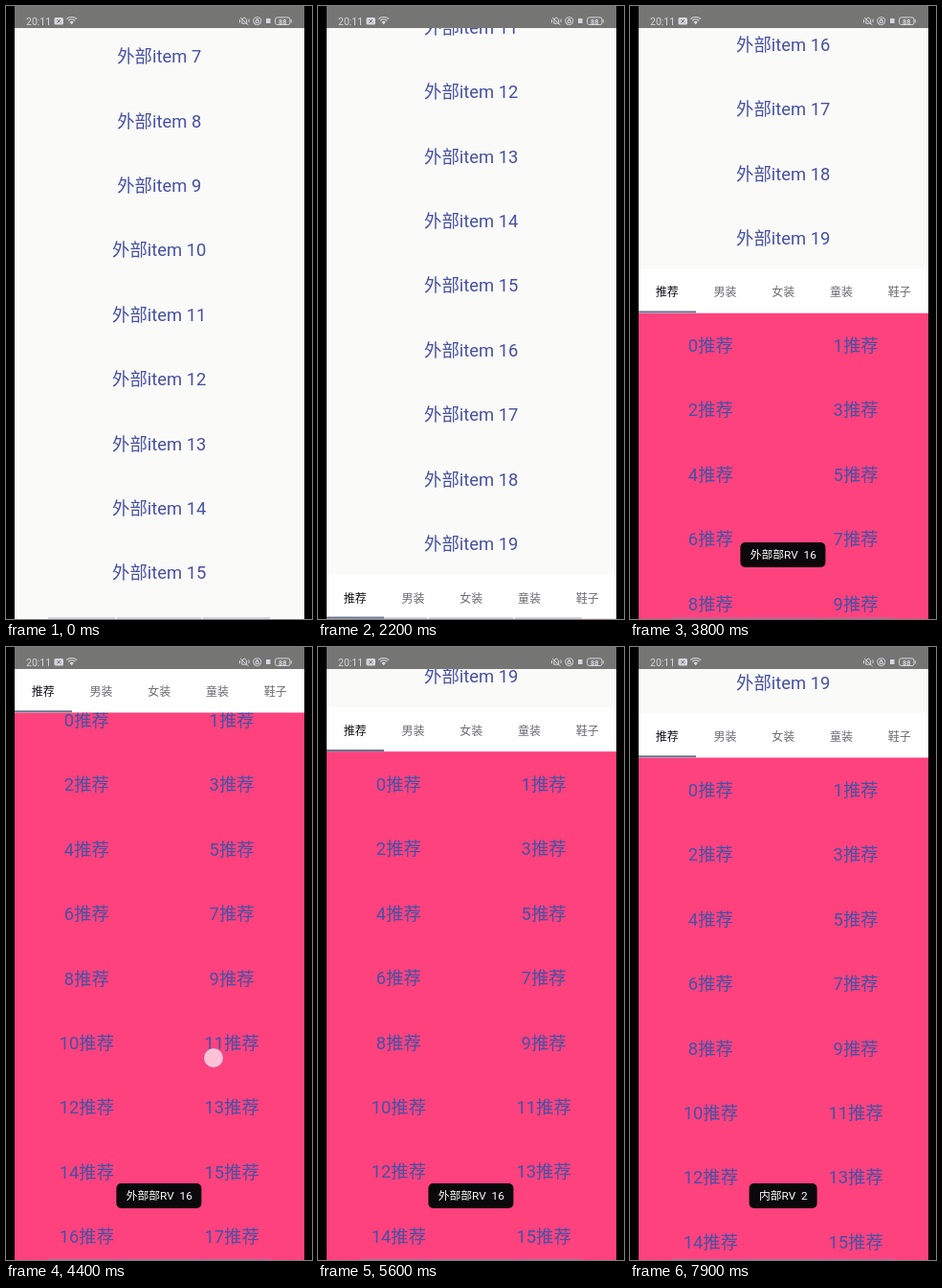
An HTML page for the animation above (8000 ms loop, 320 px wide and 640 px high).

```html
<!DOCTYPE html>
<html lang="zh-CN">
<head>
<meta charset="utf-8">
<style>
  html, body { margin: 0; width: 100%; height: 100%; overflow: hidden; background: #000; }
  body { font-family: Roboto, 'Noto Sans CJK SC', 'Noto Sans CJK', sans-serif; }
  div, svg { position: absolute; box-sizing: border-box; }
  #phone { left: 0; top: 0; width: 320px; height: 640px; overflow: hidden; background: #000; }
  #screen { left: 8.5px; top: 0; width: 303.5px; height: 640px; overflow: hidden; background: #fafaf9; }
  .label { color: #4651a4; font-size: 18.4px; line-height: 30px; text-align: center; white-space: pre; }
  #outer, #grid { left: 0; top: 0; width: 100%; }
  #pager { left: 0; top: 0; width: 100%; height: 640px; }
  #pink { left: 0; top: 46px; width: 100%; height: 640px; overflow: hidden; background: #fd427e; }
  #tabs { left: 0; top: 0; width: 100%; height: 46px; background: #fff; }
  #tabs div { top: 0; width: 20%; line-height: 50px; font-size: 12px; text-align: center; color: #6c6c72; }
  #tabs div:first-child { color: #141418; font-weight: 500; }
  #tabs i { position: absolute; left: 0; bottom: 0; width: 20%; height: 2px; background: #65738c; }
  #nav { left: 44px; top: 638px; width: 232px; height: 2px;
    background: linear-gradient(90deg, #88a5 70px, #0000 70px 72px, #88a5 72px 160px, #0000 160px 162px, #88a5 162px); }
  .toast { top: 560px; left: 160.3px; height: 26px; padding: 0 10px; border-radius: 5px; background: #0a080a;
    color: #fff; font-size: 11.8px; line-height: 27px; white-space: pre; transform: translateX(-50%); }
  #dot { left: -10px; top: -10px; width: 20px; height: 20px; border-radius: 50%;
    background: rgba(255,255,255,.68); border: 1.5px solid rgba(195,197,240,.8); }
  #status { left: 8.5px; top: 0; width: 303.5px; height: 22.7px; background: #757573; }
  #bar { left: 0; top: 0; }
</style>
</head>
<body>
<div id="phone">
  <div id="screen">
    <div id="outer"></div>
    <div id="pager">
      <div id="pink"><div id="grid"></div></div>
      <div id="tabs"></div>
    </div>
  </div>
  <div id="nav"></div>
  <div id="dot"></div>
  <div id="status"></div>
  <svg id="bar" width="320" height="23" fill="none" stroke="#d6d6de">
    <g fill="#d6d6de" stroke="none">
      <text x="21" y="19.5" font-size="10.5">20:11</text>
      <rect x="50.5" y="12" width="9.5" height="7.5" rx="1.5"/>
      <path d="M66.5 16.8a3.4 3.4 0 0 1 4.4 0l-2.2 2.5z"/>
      <rect x="272" y="13" width="4.5" height="5"/>
      <text x="289.3" y="18.6" font-size="7.5" font-weight="700" text-anchor="middle">88</text>
    </g>
    <path d="M53.5 14l3.5 3.5m0-3.5l-3.5 3.5" stroke="#666"/>
    <path d="M63.3 13.6a8 8 0 0 1 10.8 0M65 15.4a5.5 5.5 0 0 1 7.4 0" stroke-width="1.2"/>
    <path d="M246.8 18.2v-3.6q2.4-5 4.8 0v3.6zM245 12l8.5 8M244.5 14v3.5M254 13.5v3.5"/>
    <circle cx="262.7" cy="15.7" r="4"/>
    <path d="M261 15.2h3.4v2.3h-3.4zM261.8 15v-1.5h1.8V15" stroke-width=".9"/>
    <rect x="281.6" y="11.9" width="15.4" height="7.6" rx="2"/>
    <path d="M298.2 14v3.4"/>
  </svg>
</div>
<script>
const $ = id => document.getElementById(id);
const LOOP = 8000, PITCH = 67.4, TAB_Y = 893.6, MAX = TAB_Y - 22.3;

function add(parent, text, style, cls = '') {
  const el = document.createElement('div');
  el.textContent = text;
  el.className = cls;
  Object.assign(el.style, style);
  parent.append(el);
  return el;
}

for (let n = 7; n < 20; n++)
  add($('outer'), '外部item ' + n, { top: 38.2 + PITCH * (n - 7) + 'px', width: '100%' }, 'label');
for (let n = 0; n < 22; n++)
  add($('grid'), n + '推荐', {
    left: n % 2 * 50 + '%', width: '50%', top: 20 + PITCH * (n >> 1) + 'px'
  }, 'label');
['推荐', '男装', '女装', '童装', '鞋子'].forEach((name, i) => add($('tabs'), name, { left: i * 20 + '%' }));
$('tabs').append(document.createElement('i'));

// Each gesture scrolls by dist; the finger starts at x, y, follows, and lifts after the share "hold"
const gestures = [
  { start: 950, time: 880, dist: 300, x: 51, y: 540.6, hold: .65 },
  { start: 3150, time: 1245, dist: 597.3, x: 242, y: 463, hold: .4 },
  { start: 4395, time: 1470, dist: -73, x: 217, y: 429, hold: .75, gain: 1.6, drift: .47 },
  { start: 6400, time: 250, dist: 0, x: 79, y: 155, hold: 1 }
];
const toasts = [
  { start: 2950, end: 6840, text: '外部部RV  16' },
  { start: 6850, end: LOOP + 1000, text: '内部RV  2' }
];
for (const o of toasts) o.el = add($('phone'), o.text, {}, 'toast');

const clamp = v => Math.max(0, Math.min(1, v));
const smooth = p => p * p * (3 - 2 * p);
const move = (id, x, y) => $(id).style.transform = `translate(${x}px,${y}px)`;

function draw(now) {
  const t = now % LOOP;
  let total = 0;
  $('dot').style.opacity = 0;
  for (const { start, time, dist, x, y, hold, gain = 1, drift = 0 } of gestures) {
    const p = clamp((t - start) / time), d = dist * smooth(p);
    total += d;
    if (p > 0 && p < hold) {
      $('dot').style.opacity = 1;
      move('dot', x + drift * d, y - gain * d);
    }
  }

  // The outer list scrolls first; the inner grid takes the rest
  const s = Math.min(total, MAX);
  move('outer', 0, -s);
  move('pager', 0, TAB_Y - s);
  move('grid', 0, s - total);

  for (const { start, end, el } of toasts)
    el.style.opacity = clamp(Math.min((t - start) / 200, (end - t) / 380));
  requestAnimationFrame(draw);
}
requestAnimationFrame(draw);
</script>
</body>
</html>
```
